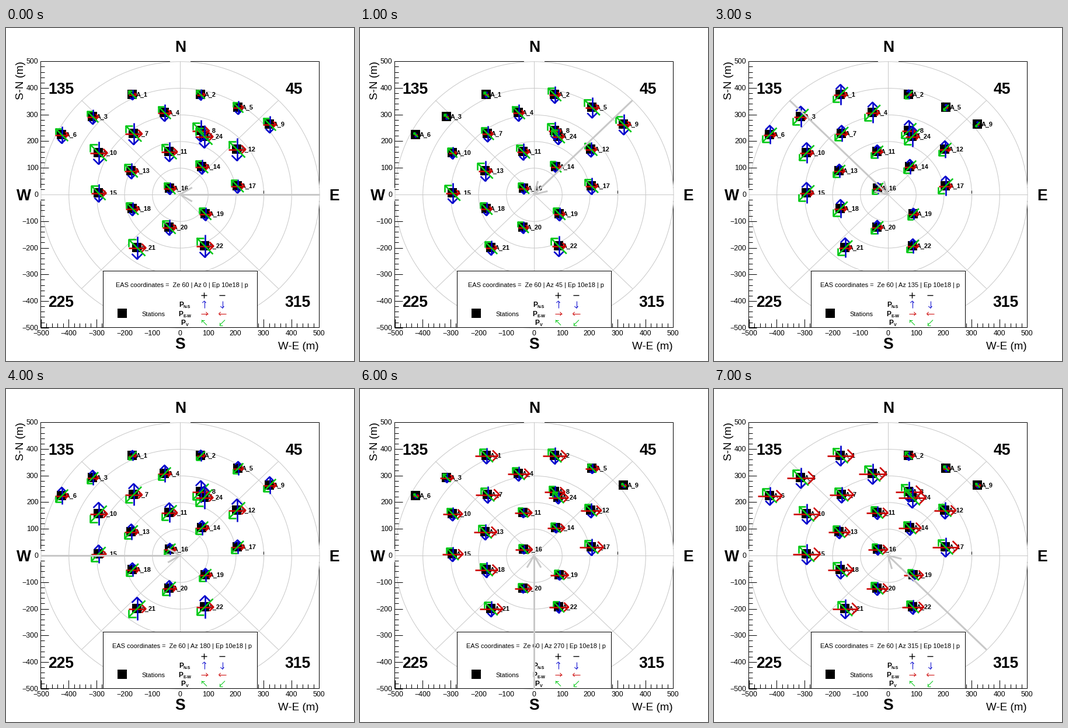
A matplotlib script for the animation above (8 s loop, 596 by 572 pixels).

```python
import math

import matplotlib.pyplot as plt
from matplotlib.animation import FuncAnimation
from matplotlib.collections import LineCollection
from matplotlib.patches import Ellipse, Rectangle

W, H, DPI = 596, 572, 100
CX, CY = 298, 286
SX, SY = 0.477, 0.4575          # pixels per metre
LEFT, RIGHT, TOP, BOTTOM = 59, 536, 57, 514
BLUE, RED, GREEN, GREY = "#0000cc", "#cc0000", "#00c814", "#c8c8c8"
STEP = 45                       # degrees of azimuth per frame
RING = 210                      # metres from the axis to the strongest signal

# Antenna positions, numbered from 1; number 23 is not in the array
SITES = [(216, 114), (333, 114), (148, 152), (271, 145), (397, 136),
         (95, 183), (218, 181), (333, 176), (451, 165), (158, 214),
         (279, 212), (395, 208), (214, 245), (335, 238), (158, 283),
         (280, 275), (396, 271), (216, 310), (341, 319), (279, 342),
         (224, 377), (340, 374), (339, 186)]
NUMBERS = [*range(1, 23), 24]

fig = plt.figure(figsize=(W / DPI, H / DPI), dpi=DPI, facecolor="white")
ax = fig.add_axes([0, 0, 1, 1])
ax.set_xlim(0, W)
ax.set_ylim(H, 0)
ax.axis("off")


def pt(px):
    return px * 72 / DPI


def text(x, y, s, size, ha="center", bold=False, z=3):
    return ax.text(x, y + 0.36 * size, s, fontsize=pt(size), ha=ha,
                   va="baseline", family="Liberation Sans", zorder=z,
                   weight="bold" if bold else "normal")


def line(x0, y0, x1, y1, color="black", width=1, z=2):
    ax.plot([x0, x1], [y0, y1], color=color, lw=pt(width), zorder=z,
            solid_capstyle="butt")


def rect(x, y, w, h, face="none", edge="none", z=1):
    ax.add_patch(Rectangle((x, y), w, h, fc=face, ec=edge, lw=pt(1), zorder=z))


def arrow(tail, tip, leg, half_angle):
    """Shaft and open head as two polylines."""
    back = math.atan2(tail[1] - tip[1], tail[0] - tip[0])
    ends = [(tip[0] + leg * math.cos(back + s * half_angle),
             tip[1] + leg * math.sin(back + s * half_angle)) for s in (-1, 1)]
    return [[tail, tip], [ends[0], tip, ends[1]]]


def centred(x, y, dx, dy, head=0.23):
    """Arrow of extent (dx, dy) centred on a point."""
    leg = head * math.hypot(dx, dy) * math.sqrt(2)
    return arrow((x - dx / 2, y - dy / 2), (x + dx / 2, y + dy / 2),
                 leg, math.pi / 4)


def rim(degrees):
    """Point of the outer circle in a compass direction."""
    a = math.radians(degrees)
    return CX + 500 * SX * math.cos(a), CY - 500 * SY * math.sin(a)


def draw_grid():
    for r in range(100, 501, 100):
        ax.add_patch(Ellipse((CX + 0.5, CY + 0.5), 2 * r * SX, 2 * r * SY,
                             fc="none", ec=GREY, lw=pt(1), zorder=1.5))
    for az in range(0, 360, STEP):
        line(CX, CY, *rim(az), GREY, z=1.5)
    line(441, 279, 441, 284)


def draw_axes():
    rect(LEFT, TOP, RIGHT - LEFT, BOTTOM - TOP, edge="black", z=1)
    rect(281, TOP - 2, 35, 4, "white", z=1.2)
    for x in (LEFT, RIGHT):
        rect(x - 2, 275, 4, 22, "white", z=1.2)
    for v in range(-500, 501, 20):
        size = 14 if v % 100 == 0 else 7
        x, y = round(CX + v * SX), round(CY - v * SY)
        line(x, BOTTOM, x, BOTTOM - size)
        if v:
            line(LEFT, y, LEFT + size, y)
        if v % 100 == 0:
            label = str(v).replace("-", "\u2212")
            text(x, 524, label, 12.4)
            text(55.5, y, label, 12.4, ha="right")
    text(536, 545, "W-E (m)", 18.8, ha="right")
    ax.text(25.5, 90, "S-N (m)", fontsize=pt(18.8), rotation=90,
            ha="center", va="center", family="Liberation Sans")
    for x, y, s in ((299, 31, "N"), (298, 541, "S"), (30, 286, "W"),
                    (562, 286, "E"), (95, 103, "135"), (493, 103, "45"),
                    (94, 469, "225"), (500, 469, "315")):
        text(x, y, s, 26.5, bold=True)


def symbol(y, name, sub_width, color, dx, dy):
    left = 306 - (8 + sub_width) / 2
    text(left, y - 0.5, "P", 12, ha="left", bold=True, z=6)
    text(left + 8, y + 3.5, name, 7.2, ha="left", bold=True, z=6)
    minus_dx = dx if dx and dy else -dx
    paths = (centred(339.5, y, dx, dy, head=0.26)
             + centred(370.5, y, minus_dx, -dy, head=0.26))
    ax.add_collection(LineCollection(paths, colors=color, linewidths=pt(1),
                                     zorder=6))


def draw_legend():
    rect(166, 417, 264, BOTTOM - 417, "white", "black", z=5)
    rect(191, 482, 16, 16, "black", z=6)
    text(252, 491, "Stations", 11, z=6)
    for x in (339, 370):
        line(x - 5, 459, x + 5, 459, width=1.4, z=6)
    line(339, 454, 339, 464, width=1.4, z=6)
    symbol(475, "N-S", 12, BLUE, 0, -12)
    symbol(491, "E-W", 13.6, RED, 12, 0)
    symbol(506, "V", 4.7, GREEN, -9, -9)


def draw_stations():
    for n, (x, y) in zip(NUMBERS, SITES):
        rect(x - 8, y - 8, 16, 16, "black", z=2)
        text(x + 6.5, y, f"A_{n}", 10.9, ha="left", bold=True, z=2.2)
    rect(166, 286, 26, 4, "white", z=2.3)
    line(166, CY, 192, CY, GREY, z=2.4)


def strength(d, core, peak, width):
    """Arrow length: rises from the core to the ring, then fades out."""
    base, w = (core, 80) if d < RING else (8, width)
    return base + (peak - base) * math.exp(-((d - RING) / w) ** 2)


def station_arrows(az):
    a = math.radians(az)
    c, s = math.cos(a), math.sin(a)
    sign = -1 if 90 < az < 270 else 1
    ns = 0.75 + 0.27 * abs(c)
    ew = 0.8 - 0.12 * math.cos(2 * a) - 0.38 * math.sin(2 * a) * c
    v = 0.8 + 0.17 * abs(c)
    width = 100 * (1 + 0.6 * c ** 4)
    paths = []
    for x, y in SITES:
        mx, my = (x - CX) / SX, (CY - y) / SY
        # distance from an axis inclined by 60 degrees
        d = math.hypot((mx * c + my * s) / 2, my * c - mx * s)
        if d > RING:
            d += 0.15 * s ** 4 * mx
        n_len = ns * strength(d, 20, 38, width)
        e_len = ew * strength(d, 31, 44, width)
        v_len = v * strength(d, 20, 29, width)
        px, py = x + 0.5, y + 0.5
        paths += centred(px, py, 0, sign * n_len)
        paths += centred(px, py, e_len, 0)
        paths += centred(px, py, -v_len, -sign * v_len)
    return paths


draw_grid()
draw_axes()
draw_legend()
draw_stations()
title = text(301, 441, "", 11, z=6)
fields = LineCollection([], colors=[BLUE, BLUE, RED, RED, GREEN, GREEN],
                        linewidths=pt(2.6), zorder=4)
shower = LineCollection([], colors=GREY, linewidths=pt(3), zorder=7)
ax.add_collection(fields, autolim=False)
ax.add_collection(shower, autolim=False)


def update(i):
    az = i * STEP
    title.set_text(f"EAS coordinates =  Ze 60 | Az {az} | Ep 10e18 | p")
    fields.set_segments(station_arrows(az))
    shower.set_segments(arrow(rim(az), (CX, CY), 24, math.pi / 6))
    return title, fields, shower


def init():
    return update(0)


anim = FuncAnimation(fig, update, frames=360 // STEP, init_func=init,
                     interval=1000, repeat=True, repeat_delay=0, blit=False)
plt.show()
```
